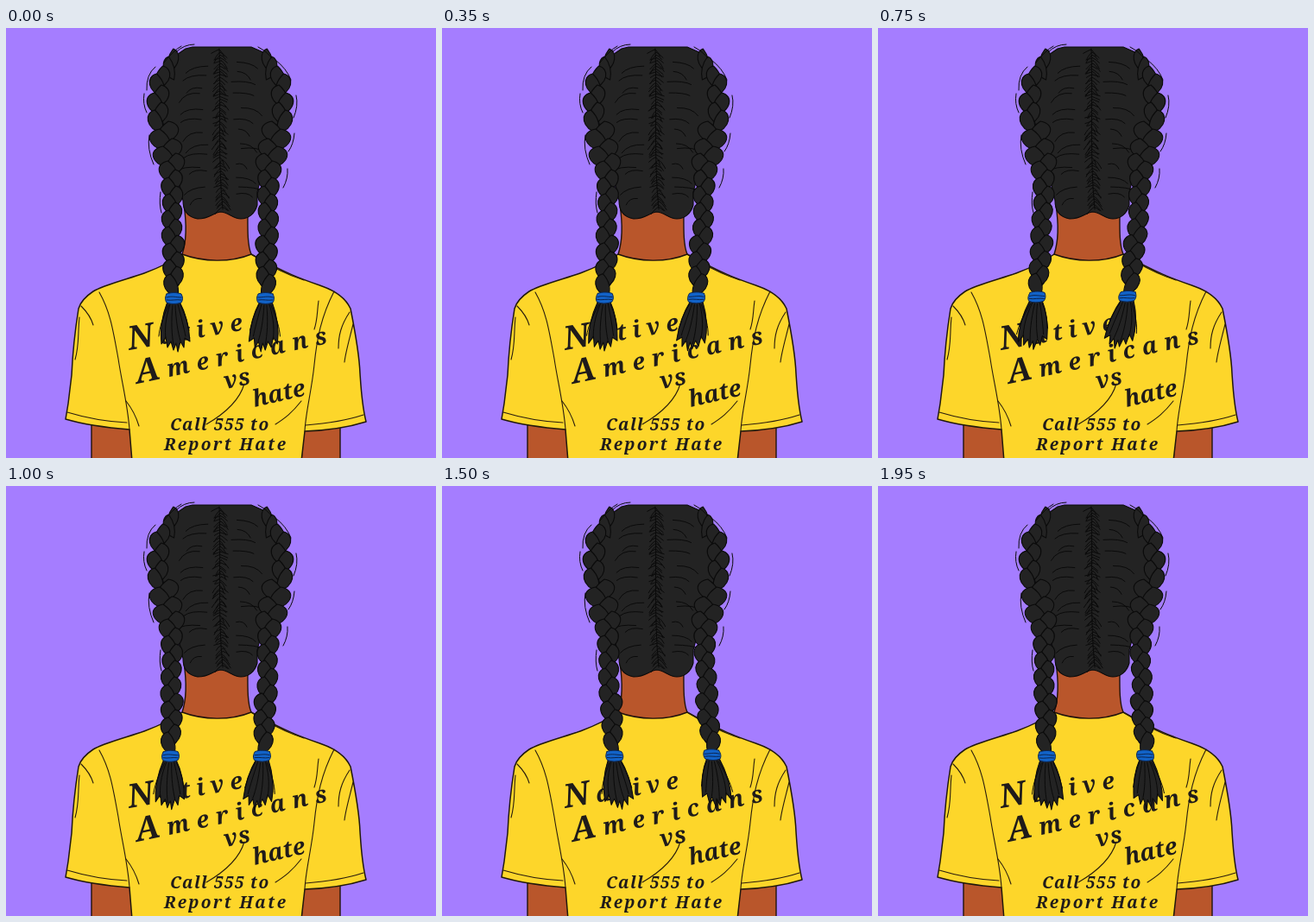
Recreate the animation shown at these times as an HTML page. Size 498x498 px, loop 2 s.

```html
<!DOCTYPE html>
<html lang="en">
<head>
<meta charset="utf-8">
<title>Braids</title>
<style>
  html, body { margin: 0; width: 100%; height: 100%; overflow: hidden; background: #a57dff; }
  svg { display: block; width: 100%; height: 100%; }
  path { stroke-linecap: round; stroke-linejoin: round; }
  .line { fill: none; stroke: #2a1d0c; stroke-width: 1.1; }
  .skin { fill: #b9562b; stroke: #21130c; stroke-width: 1.4; }
  .shirt { fill: #fdd62a; stroke: #21190c; stroke-width: 1.5; }
  .hair { fill: #232323; stroke: #0b0b0b; stroke-width: 1.1; }
  .strand { fill: none; stroke: #0a0a0a; stroke-width: 1; }
  .core { fill: none; stroke: #232323; stroke-width: 15; }
  .tie { fill: #1263c8; stroke: #0b2550; stroke-width: 1; }
  .tieLine { fill: none; stroke: #0b2550; stroke-width: 1; }
  text { font-family: "Noto Serif", "Liberation Serif", serif; font-style: italic; font-weight: 600; font-size: 27px; fill: #1f1b1a; }
  .cap { font-size: 38px; }
  .small { font-size: 19px; }
</style>
</head>
<body>
<svg viewBox="0 0 498 498">
  <rect width="498" height="498" fill="#a57dff"/>
  <path class="skin" d="M99,455 L99,502 L147,502 L144,455Z M342,502 L345,455 L387,455 L387,502Z"/>
  <path class="shirt" d="M204,262 C190,272 176,278 160,284 C140,291 112,298 101,305 C92,311 86,318 84,325 C80,350 77,380 76,402 L72,435 L69,453 C90,459 118,463 143,465 L146,502 L342,502 L346,467 C375,466 398,462 417,456 C412,436 411,415 410,400 C409,375 404,350 399,325 C393,312 380,304 366,299 C343,291 325,285 284,262Z"/>
  <path class="skin" d="M206,205 C209,225 209,247 204,262 C228,271 260,272 284,262 C279,250 280,230 280,205Z"/>
  <g class="line">
    <path d="M108,306 C121,329 124,350 130,383 C134,410 141,437 143,465"/>
    <path d="M380,305 C365,334 360,360 357,390 C354,420 347,445 346,467"/>
    <path d="M362,316 C360,330 361,337 357,349"/>
    <path d="M87,322 C94,329 99,337 101,344 M85,335 C83,355 85,367 80,384"/>
    <path d="M398,329 C388,344 385,356 385,371 M402,343 C396,367 393,377 392,387"/>
    <path d="M71,445 C94,452 119,456 140,457 M347,460 C372,458 396,454 414,448"/>
    <path d="M276,412 C270,433 251,448 232,459 M139,432 C147,442 151,451 154,461"/>
    <path d="M342,432 C331,446 323,452 312,459 M284,262 C306,276 326,286 345,292"/>
  </g>
  <g>
    <text transform="translate(143 373) rotate(-10)" letter-spacing="7"><tspan class="cap">N</tspan>ative</text>
    <text transform="translate(152 412) rotate(-12)" letter-spacing="8.5"><tspan class="cap">A</tspan>mericans</text>
    <text transform="translate(254 418) rotate(-11)" letter-spacing="1">vs</text>
    <text transform="translate(288 439) rotate(-13)">hate</text>
    <text class="small" x="190" y="466" letter-spacing="1.4">Call 555 to</text>
    <text class="small" x="183" y="489" letter-spacing="2.4">Report Hate</text>
  </g>
  <path class="hair" d="M208,24 L216,22 L284,22 L300,29 C314,40 321,62 319,100 C306,130 299,160 291,190 L291,205 C288,216 280,221 272,221 C262,221 258,213 248,213 C240,214 236,221 222,221 C210,219 205,212 205,200 C196,160 190,130 178,100 C175,62 184,38 208,24Z"/>
  <g id="scalp"></g>
  <g id="braids"></g>
  <path class="strand" d="M218,19 Q206,19 197,28 M203,21 Q194,26 183,40 M173,45 Q162,54 163,72 M160,76 Q158,88 163,98 M166,124 Q163,140 171,158 M292,22 Q303,28 308,35 M312,37 Q325,47 330,60 M336,78 Q339,90 333,104 M334,122 Q333,135 327,143 M326,163 Q327,174 321,185 M179,190 Q177,204 180,214"/>
</svg>
<script>
const LOOP = 2000, STEP = 50, AXIS = 496;
const SVG = "http://www.w3.org/2000/svg";
const scalp = document.getElementById("scalp");
const braids = document.getElementById("braids");

let seed = 7;
const random = () => (seed = (seed * 16807) % 2147483647) / 2147483647;
const spread = size => (random() - 0.5) * 2 * size;

function addPath(parent, className, d) {
  const path = document.createElementNS(SVG, "path");
  path.setAttribute("class", className);
  path.setAttribute("d", d);
  parent.append(path);
  return path;
}

// Parting: short hairs feathering away from the centre line.
let parting = "M247,24 C249,90 245,150 251,210";
for (let y = 25; y < 210; y += 3.2) {
  const x = 248 + (y > 150 ? 2 : 0) + spread(1.5);
  for (const side of [-1, 1])
    parting += `M${x},${y} q${side * 3},1 ${side * (5 + random() * 4)},${6 + spread(4)}`;
}
addPath(scalp, "strand", parting);

let combed = "";
for (let y = 40; y < 205; y += 13) {
  for (const side of [-1, 1]) {
    const reach = 14 + random() * 20;
    const x = 248 + side * (13 + random() * 12);
    combed += `M${x},${y + spread(5)} q${side * reach * 0.6},${spread(2) - 1} ${side * reach * 0.85},${7 + spread(4)}`;
  }
}
addPath(scalp, "strand", combed);

// Left braid as [x, y, half width]; the right one is its mirror image.
const spine = [
  [191, 42, 9], [178, 62, 12], [176, 84, 13], [176, 104, 12], [183, 126, 17],
  [187, 146, 17], [192, 163, 15], [192, 182, 12.5], [193, 201, 12], [192, 220, 12],
  [192, 239, 12], [194, 258, 13], [194, 277, 12.5], [194, 294, 11.5]
];
const leaf = (x, y, w, side) => {
  const at = (dx, dy) => `${x + side * w * dx},${y + dy}`;
  return `M${at(0.3, -14)} C${at(1.35, -11)} ${at(1.25, 7)} ${at(-0.4, 13)} C${at(-0.6, 4)} ${at(-0.4, -6)} ${at(0.3, -14)}Z`;
};
const parts = [["core", "M" + spine.slice(5).map(([x, y]) => `${x},${y}`).join(" L")]];
for (const [x, y, w] of spine) {
  parts.push(["hair", leaf(x, y - 4, w, 1)]);
  parts.push(["hair", leaf(x, y + 5, w, -1)]);
}
parts.push(
  ["hair", "M187,317 C180,335 178,350 180,366 L185,358 L187,370 L191,363 L194,373 L197,365 L199,375 L202,363 L206,370 L207,359 L213,363 C212,345 208,330 201,317Z"],
  ["strand", "M190,320 C184,338 184,350 185,361 M193,321 C191,340 192,355 194,367 M196,321 C197,340 199,352 202,362 M199,320 C203,335 206,347 208,357 M188,321 C181,338 178,346 177,357 M202,321 C208,332 210,342 212,350"],
  ["tie", "M186,308 C191,306 198,306 203,308 C205,312 205,315 203,318 C197,320 191,320 186,318 C184,315 184,312 186,308Z"],
  ["tieLine", "M186,312 C192,310 197,312 203,312 M186,315 C192,316 197,314 203,315"]
);

const makeBraid = mirrored => parts.map(([className, d]) => ({ path: addPath(braids, className, d), d, mirrored }));
const left = makeBraid(false), right = makeBraid(true);

// The hanging part bends more strongly towards its tip.
function bend(braid, swing) {
  for (const { path, d, mirrored } of braid) {
    path.setAttribute("d", d.replace(/([\d.]+),([\d.]+)/g, (_, px, py) => {
      const x = mirrored ? AXIS - px : +px, y = +py;
      const pull = Math.max(0, (y - 165) / 148) ** 1.7;
      return `${(x + swing * pull).toFixed(2)},${(y - swing * swing * 0.014 * pull).toFixed(2)}`;
    }));
  }
}

const times = [0, 200, 550, 1000, 1250, 1700, 1950];
const leftSwing = [0, 0, -13, -4, 1, 7, 1];
const rightSwing = [-1, 0, -15, -5, 5, 14, 8];

// Smooth curve through the swing keys.
function sample(values, time) {
  const last = times.length - 1;
  const slope = i => {
    const a = Math.max(0, i - 1), b = Math.min(last, i + 1);
    return (values[b] - values[a]) / (times[b] - times[a]);
  };
  let i = 0;
  while (i < last - 1 && time >= times[i + 1]) i++;
  const span = times[i + 1] - times[i];
  const u = (time - times[i]) / span, v = 1 - u;
  return v * v * (1 + 2 * u) * values[i] + u * u * (1 + 2 * v) * values[i + 1]
    + span * u * v * (v * slope(i) - u * slope(i + 1));
}

function draw() {
  const step = Math.floor((performance.now() % LOOP) / STEP) * STEP;
  const time = step < 100 ? 0 : step;
  bend(left, sample(leftSwing, time));
  bend(right, sample(rightSwing, time));
  requestAnimationFrame(draw);
}
draw();
</script>
</body>
</html>
```
